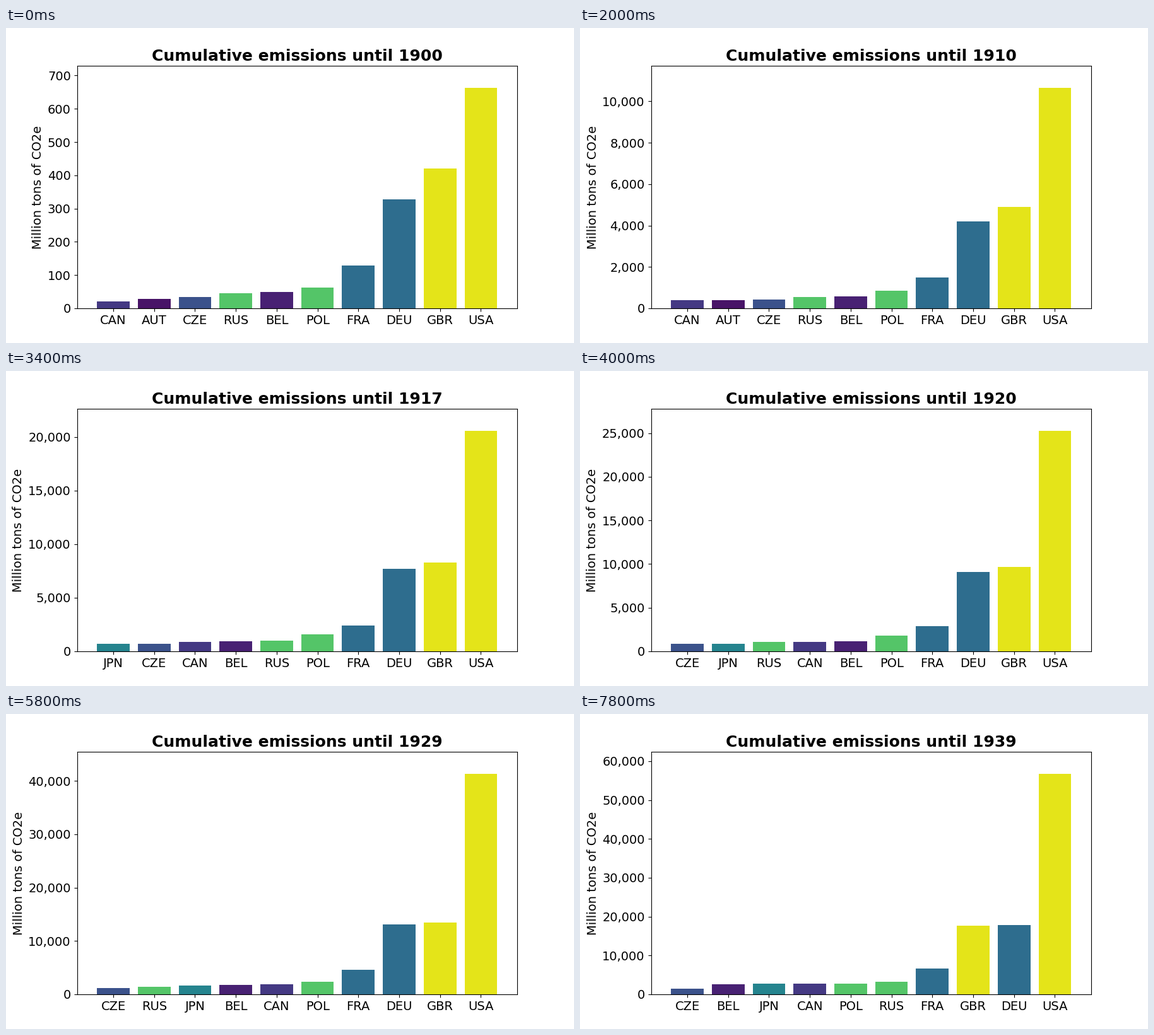
Write a matplotlib script that moves like this. It is 900x500 px and loops after 8 s.

```python
import numpy as np
import matplotlib.pyplot as plt
from matplotlib.animation import FuncAnimation
from matplotlib.ticker import StrMethodFormatter

plt.rcParams["font.family"] = "DejaVu Sans"

YEARS = np.arange(1900, 1940)
KEYS = [1900, 1910, 1917, 1929, 1939]
USA_KEYS = [1900, 1910, 1917, 1924, 1929, 1935, 1939]


def curve(keys, totals):
    """Smooth yearly totals through a few key points (cubic Hermite)."""
    keys, totals = np.array(keys), np.array(totals, float)
    slopes = np.gradient(totals, keys, edge_order=2)
    k = np.clip(np.searchsorted(keys, YEARS, "right") - 1, 0, len(keys) - 2)
    span = keys[k + 1] - keys[k]
    t = (YEARS - keys[k]) / span
    rise = (totals[k + 1] - totals[k]) * t * t * (3 - 2 * t)
    bend = t * (1 - t) * (slopes[k] * (1 - t) - slopes[k + 1] * t)
    return totals[k] + rise + span * bend


# Cumulative million tons at the key years.
data = {
    "CAN": curve(KEYS, [21, 390, 872, 1890, 2755]),
    "AUT": curve(KEYS, [28, 396, 660, 900, 1090]),
    "CZE": curve(KEYS, [34, 425, 715, 1205, 1530]),
    "RUS": curve(KEYS, [45, 545, 990, 1430, 3200]),
    "BEL": curve(KEYS, [49, 575, 935, 1765, 2600]),
    "JPN": curve(KEYS, [15, 330, 705, 1620, 2720]),
    "POL": curve(KEYS, [62, 850, 1590, 2370, 2795]),
    "FRA": curve(KEYS, [129, 1490, 2400, 4600, 6640]),
    "DEU": curve(KEYS, [328, 4200, 7700, 13120, 17850]),
    "GBR": curve(KEYS, [420, 4900, 8300, 13480, 17660]),
    "USA": curve(USA_KEYS, [663, 10648, 20588, 31984, 41318, 50072, 56750]),
}
COLORS = {
    "CAN": "#443983", "AUT": "#481467", "CZE": "#3b528b", "RUS": "#54c568",
    "BEL": "#482173", "JPN": "#25848e", "POL": "#54c568", "FRA": "#2e6d8e",
    "DEU": "#2e6d8e", "GBR": "#e4e419", "USA": "#e4e419",
}

fig, ax = plt.subplots(figsize=(9, 5), dpi=100)


def draw(i):
    ax.clear()
    top = sorted(data, key=lambda code: data[code][i])[-10:]
    values = [data[code][i] for code in top]
    ax.bar(top, values, color=[COLORS[code] for code in top])
    ax.set_ylim(0, max(values) * 1.1)
    ax.yaxis.set_major_formatter(StrMethodFormatter("{x:,.0f}"))
    ax.tick_params(labelsize=14)
    ax.set_ylabel("Million tons of CO2e", fontsize=14)
    ax.set_title(f"Cumulative emissions until {YEARS[i]}",
                 fontsize=18, fontweight="bold")
    return []


anim = FuncAnimation(fig, draw, frames=len(YEARS), interval=200,
                     init_func=lambda: draw(0), repeat=True, repeat_delay=0)
plt.show()
```
